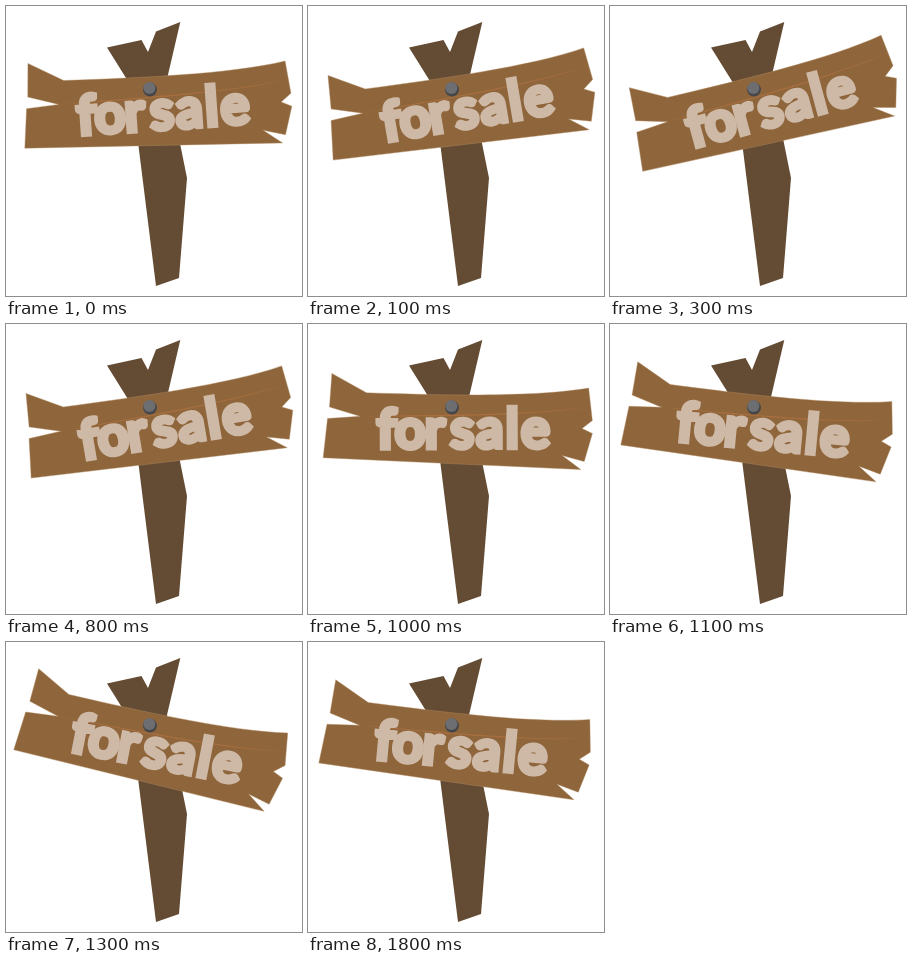
Animation of 296 by 290 pixels, one loop 2000 ms. Source, as an HTML page with a canvas:

```html
<!DOCTYPE html>
<html lang="en">
<head>
<meta charset="utf-8">
<title>For sale sign</title>
<style>
  html, body { margin: 0; width: 100%; height: 100%; overflow: hidden; background: #fff; }
  canvas { display: block; width: 296px; height: 290px; }
</style>
</head>
<body>
<canvas id="stage" width="296" height="290" role="img" aria-label="for sale"></canvas>
<script>
const ctx = document.getElementById('stage').getContext('2d');
const LOOP = 2000;
const HALF = LOOP / 2;
const REST = -2.1;      // degrees, middle of the swing
const FIRST = 1.9;      // smallest lean to either side
const STEP = 5.6;       // added by each further step
const nail = { x: 144, y: 83 };

// The board leans left, then right, in steps centred on 550 ms of each half
function angleAt(t) {
  const side = t < HALF ? -1 : 1;
  const gap = Math.abs(t % HALF - 550);
  const steps = gap <= 250 ? 2 : gap <= 450 ? 1 : 0;
  return (REST + side * (FIRST + STEP * steps)) * Math.PI / 180;
}

function disc(x, y, r, color) {
  ctx.beginPath();
  ctx.arc(x, y, r, 0, Math.PI * 2);
  ctx.fillStyle = color;
  ctx.fill();
}

// A V-shaped cut: in to the tip, then out to the next corner
function notch(tipX, tipY, x, y) {
  ctx.lineTo(tipX, tipY);
  ctx.lineTo(x, y);
}

function drawPost() {
  ctx.beginPath();
  ctx.moveTo(101, 41.5);
  ctx.lineTo(135.5, 34);
  notch(142, 46, 150, 25.5);
  ctx.lineTo(174.3, 16);
  notch(161, 73, 181, 172);
  ctx.lineTo(173, 272);
  ctx.lineTo(150, 280);
  ctx.lineTo(125, 80);
  ctx.fillStyle = '#644b33';
  ctx.fill();
}

function drawPlank() {
  ctx.beginPath();
  ctx.moveTo(24, 49);
  ctx.lineTo(58.5, 68.5);
  ctx.bezierCurveTo(130, 71, 225, 74, 280.7, 64.5);
  ctx.lineTo(284.3, 97);
  notch(274, 105, 284.3, 110);
  ctx.lineTo(276, 138);
  notch(254, 132, 272.5, 146);
  ctx.lineTo(15, 133.3);
  ctx.lineTo(19.5, 94);
  notch(52, 92, 21.5, 82.5);
  ctx.closePath();
  ctx.fillStyle = '#8f663b';
  ctx.fill();
  ctx.strokeStyle = 'rgba(176, 138, 98, 0.5)';
  ctx.lineWidth = 0.8;
  ctx.stroke();

  // Thin grain line running on from the split
  ctx.beginPath();
  ctx.moveTo(52, 92);
  ctx.bezierCurveTo(120, 90.5, 220, 92, 283, 83);
  ctx.bezierCurveTo(220, 93.5, 120, 92.5, 52, 92);
  ctx.fillStyle = 'rgba(186, 116, 66, 0.6)';
  ctx.fill();
}

function drawWord(word, x, spacing) {
  ctx.letterSpacing = spacing + 'px';
  ctx.strokeText(word, x, 123.2);
  ctx.fillText(word, x, 123.2);
}

function drawLettering() {
  ctx.font = '400 53px Lato, "Liberation Sans", sans-serif';
  ctx.textAlign = 'center';
  ctx.lineJoin = 'miter';
  ctx.miterLimit = 2;
  ctx.lineWidth = 6.4;
  ctx.fillStyle = ctx.strokeStyle = '#ceb9a7';
  drawWord('for', 103, 0);
  drawWord('sale', 193.5, 3);
}

function drawNail() {
  disc(nail.x, nail.y + 0.6, 7, '#45464a');
  disc(nail.x - 0.6, nail.y - 1, 6, '#6c6e72');
}

function draw(t) {
  ctx.fillStyle = '#fff';
  ctx.fillRect(0, 0, 296, 290);
  drawPost();
  ctx.save();
  ctx.translate(nail.x, nail.y);
  ctx.rotate(angleAt(t));
  ctx.translate(-nail.x, -nail.y);
  drawPlank();
  drawLettering();
  ctx.restore();
  drawNail();
}

const begin = performance.now();

function tick() {
  draw((performance.now() - begin) % LOOP);
  requestAnimationFrame(tick);
}
tick();
</script>
</body>
</html>
```
